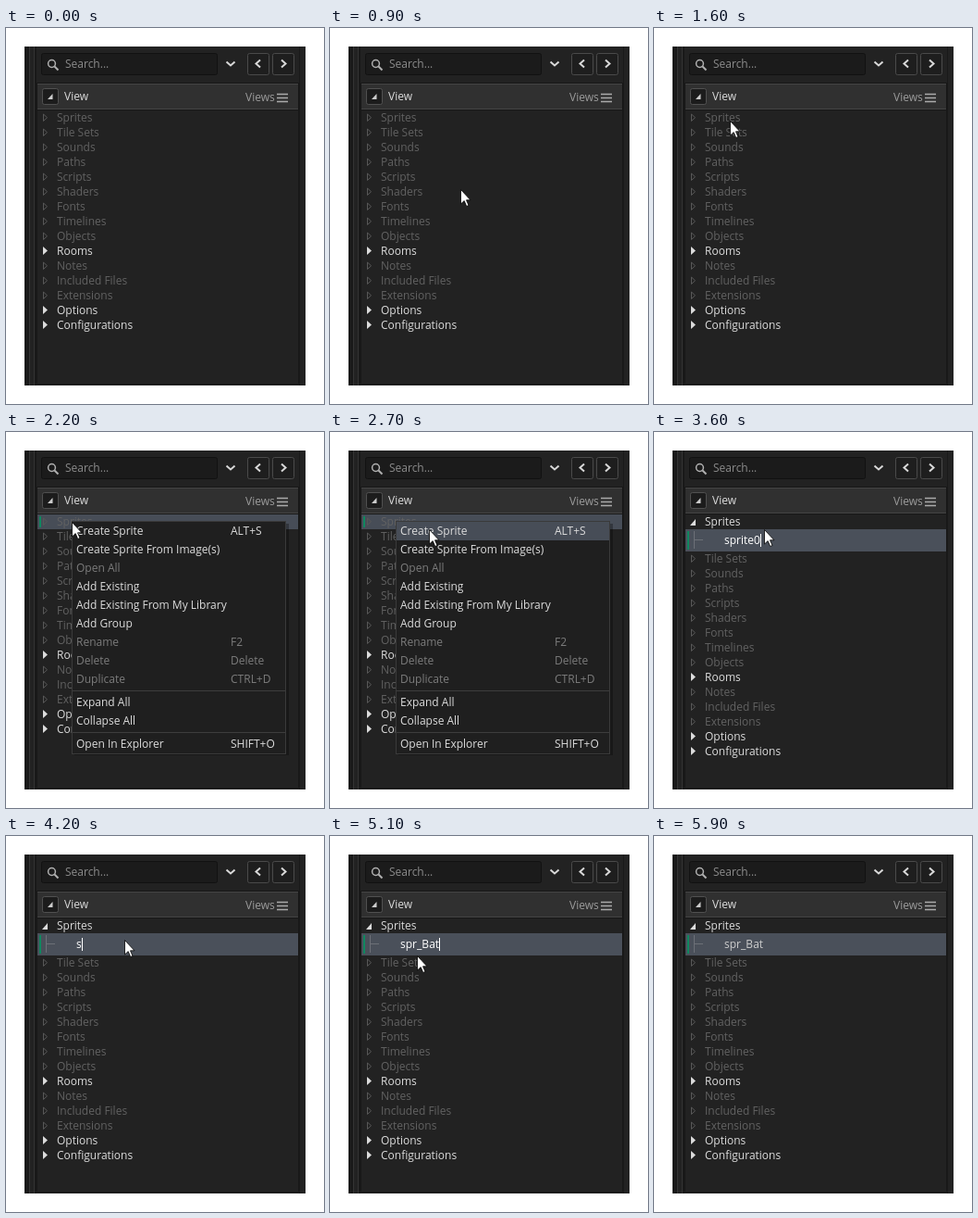
An HTML page that plays this animation: 344 px wide and 406 px high, repeating every 6900 ms.

```html
<!DOCTYPE html>
<html lang="en">
<head>
<meta charset="utf-8">
<title>Creating a sprite</title>
<style>
html, body { margin: 0; width: 100%; height: 100%; overflow: hidden; background: #fff; }
svg { display: block; width: 344px; height: 406px; }
text { font: 12px "Open Sans", "Noto Sans", sans-serif; fill: #dcdcdc; white-space: pre; }
.dim { fill: #626262; }
.off { fill: #7c7c7c; }
.line { fill: none; stroke: #d8d8d8; stroke-width: 2; }
</style>
</head>
<body>
<svg viewBox="0 0 344 406">
  <rect x="20" y="20" width="304" height="366" fill="#222"/>
  <path d="M20 20h5v366h-5zM31 20h2v366h-2zM317 20h1v366h-1z" fill="#191919"/>
  <path d="M25.5 20v366M30.5 20v366" stroke="#343434"/>
  <path d="M33.5 89V384.5H316.5V89" fill="none" stroke="#181818"/>

  <rect x="38.500" y="27.500" width="190" height="23" rx="2" fill="#1b1b1b" stroke="#111"/>
  <g class="line" style="stroke:#b0b0b0;stroke-width:1.5">
    <circle cx="49.500" cy="38.500" r="3.900"/>
    <path d="M52.500 41.500l4 4" stroke-width="2"/>
  </g>
  <text x="64" y="43" style="fill:#8c8c8c">Search...</text>
  <path class="line" d="M238.500 36.500l4.500 4 4.500-4"/>
  <g fill="#1e1e1e" stroke="#4a4a4a">
    <rect x="261.500" y="27.500" width="23" height="23" rx="2"/>
    <rect x="288.500" y="27.500" width="23" height="23" rx="2"/>
  </g>
  <path class="line" d="M275 34.500l-4.500 4 4.500 4M298 34.500l4.500 4-4.500 4"/>

  <rect x="33.500" y="59.500" width="283" height="29" fill="#303030" stroke="#171717"/>
  <path d="M34 60.500H316M34 87.500H316" stroke="#454545"/>
  <rect x="39.500" y="65.500" width="17" height="17" rx="2" fill="#1c1c1c" stroke="#505050"/>
  <path d="M45 77l5.500-6v6z" fill="#ccc"/>
  <text x="63" y="78">View</text>
  <text x="259" y="79" style="fill:#9c9c9c">Views</text>
  <path d="M293 71.500h12M293 75.500h12M293 79.500h12" stroke="#aaa" stroke-width="1.500"/>

  <g id="hover">
    <rect x="34" y="89" width="282" height="16" fill="#474d57"/>
    <path d="M36 91h2v12h-2z" fill="#10875f"/>
  </g>
  <g id="top"></g>
  <g id="rest"></g>

  <g id="item">
    <path d="M39 101h6v-7z" fill="#dcdcdc"/>
    <rect x="34" y="105" width="282" height="24" fill="#4a505a"/>
    <path d="M36 107h2v20h-2z" fill="#10875f"/>
    <path d="M43.500 107v19M44 116.500h9" fill="none" stroke="#6c7077"/>
    <g id="icon">
      <rect x="54" y="108" width="18" height="18" rx="3" fill="#4a505a" stroke="#fff" stroke-width="2"/>
      <path d="M66 126v-2q0-3 3-3h3v2q0 3-3 3z" fill="#fff" stroke="#fff"/>
    </g>
    <text id="name" x="76" y="121"></text>
    <path id="caret" d="M.5 110v14" stroke="#fff"/>
  </g>

  <g id="menu">
    <rect x="74" y="99" width="232" height="250" fill="#000" opacity=".3"/>
    <rect x="71.500" y="96.500" width="231" height="251" fill="#1f1f1f" stroke="#3a3a3a"/>
    <rect id="pick" x="72" y="97" width="230" height="20" fill="#474d57"/>
    <path d="M72 279.500h230M72 324.500h230" stroke="#3d3d3d"/>
  </g>
  <path id="mouse" d="M.5.5v15.500l3.700-3.400 2.500 5.900 2.300-1-2.500-5.700h4.500z" fill="#fff" stroke="#000" stroke-width=".8"/>
</svg>
<script>
const $ = id => document.getElementById(id);

function add(parent, tag, attrs, text = "") {
  const el = document.createElementNS("http://www.w3.org/2000/svg", tag);
  for (const key in attrs) el.setAttribute(key, attrs[key]);
  el.textContent = text;
  parent.append(el);
  return el;
}

const folders = ["Sprites", "Tile Sets", "Sounds", "Paths", "Scripts", "Shaders", "Fonts", "Timelines",
  "Objects", "Rooms", "Notes", "Included Files", "Extensions", "Options", "Configurations"];
const filled = ["Rooms", "Options", "Configurations"];
const rows = folders.map((label, i) => {
  const y = 97 + 16 * i, bright = filled.includes(label), g = i ? $("rest") : $("top");
  const arrow = add(g, "path", bright
    ? { d: `M40 ${y - 5}v9l5-4.500z`, fill: "#dcdcdc" }
    : { d: `M40.500 ${y - 4}v7.500l4-3.750z`, fill: "none", stroke: "#585858" });
  const text = add(g, "text", { x: 55, y: y + 4, class: bright ? "" : "dim" }, label);
  return { arrow, text };
});

// label, shortcut, disabled
const entries = [["Create Sprite", "ALT+S"], ["Create Sprite From Image(s)"], ["Open All", "", 1],
  ["Add Existing"], ["Add Existing From My Library"], ["Add Group"], ["Rename", "F2", 1],
  ["Delete", "Delete", 1], ["Duplicate", "CTRL+D", 1], ["Expand All"], ["Collapse All"],
  ["Open In Explorer", "SHIFT+O"]];
entries.forEach(([label, keys, off], i) => {
  const y = 111 + 20 * i + (i > 8 ? 5 : 0) + (i > 10 ? 5 : 0), cls = off ? "off" : "";
  add($("menu"), "text", { x: 76, y, class: cls }, label);
  if (keys) add($("menu"), "text", { x: 243, y, class: cls }, keys);
});

// time, x, y of the pointer
const path = [[100, 192, 365], [400, 171, 273], [700, 155, 206], [900, 141, 174], [1400, 92, 111],
  [1600, 82, 100], [2100, 71, 97], [2200, 71, 97], [2800, 114, 107], [3000, 116, 106], [3500, 118, 104],
  [4200, 128, 112], [4900, 120, 104], [5500, 43, 179]];

function pointer(t) {
  const i = Math.max(1, path.findIndex(p => p[0] >= t));
  const [t0, x0, y0] = path[i - 1], [t1, x1, y1] = path[i];
  const k = (t - t0) / (t1 - t0), mix = (a, b) => Math.round(a + (b - a) * k);
  return [mix(x0, x1), mix(y0, y1)];
}

function typed(t) {
  return t <= 4200
    ? "sprite0".slice(0, Math.min(7, 7 - (t - 3600) / 100))
    : "spr_Bat".slice(0, 1 + (t - 4200) / 100);
}

const show = (el, on) => el.style.display = on ? "" : "none";

function draw(now) {
  const t = Math.min(5900, Math.floor(now % 6900 / 100) * 100);
  const open = t >= 2900;

  show($("hover"), t >= 2000 && !open);
  show($("menu"), t >= 2200 && !open);
  show($("pick"), t >= 2400);
  show($("item"), open);
  show($("icon"), t < 3400);
  show($("caret"), t < 5600);
  show(rows[0].arrow, !open);
  rows[0].text.setAttribute("class", open ? "" : "dim");
  $("rest").setAttribute("transform", `translate(0 ${open ? 24 : 0})`);

  if (open) {
    const name = $("name"), tone = 255 - Math.max(0, t - 5600) / 300 * 50;
    name.textContent = typed(t);
    name.style.fill = `rgb(${tone},${tone},${tone})`;
    $("caret").setAttribute("transform", `translate(${Math.round(76 + name.getComputedTextLength())} 0)`);
  }

  const moving = t >= 100 && t <= 5500;
  show($("mouse"), moving);
  if (moving) $("mouse").setAttribute("transform", `translate(${pointer(t)})`);
}

const start = performance.now();
function tick() {
  draw(performance.now() - start);
  requestAnimationFrame(tick);
}
tick();
</script>
</body>
</html>
```
